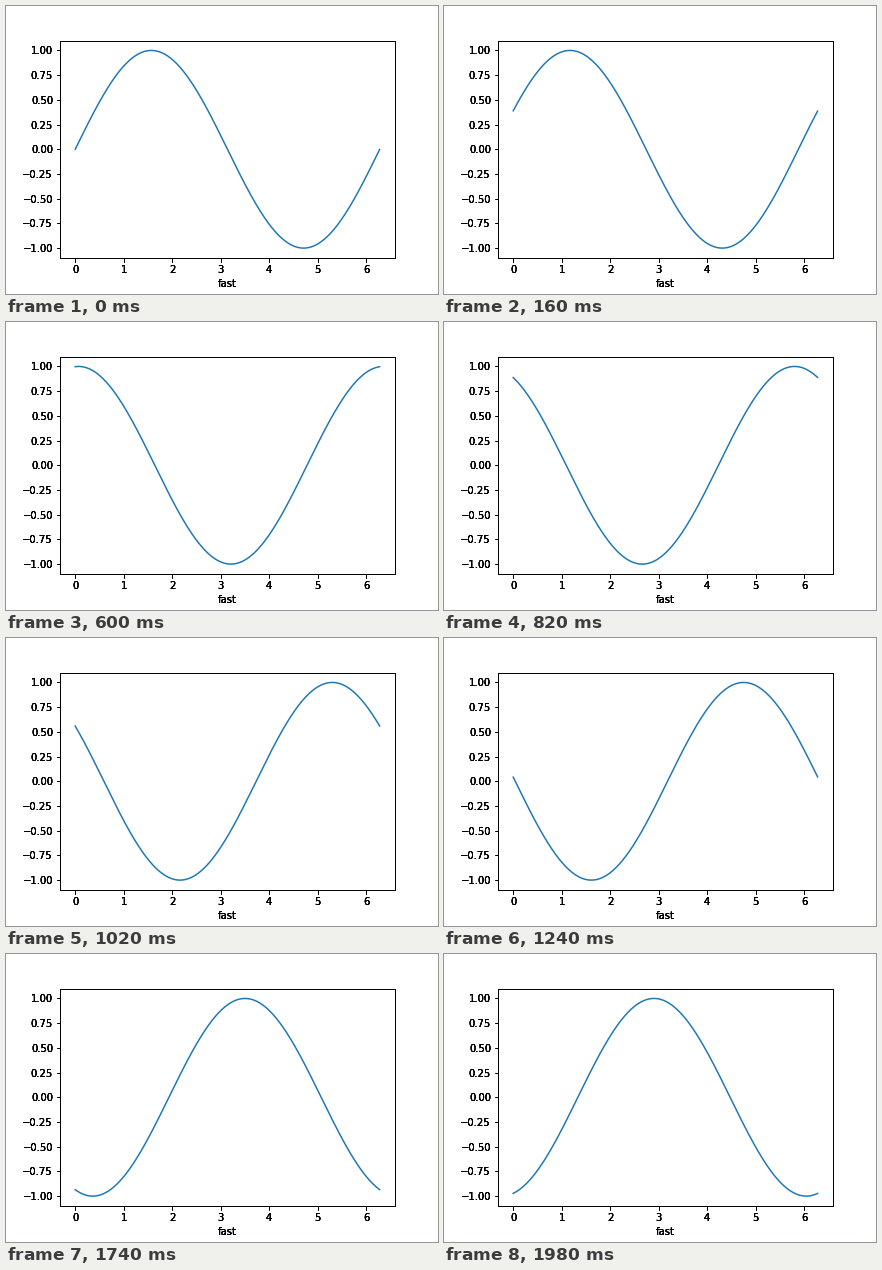
A matplotlib script that plays this animation: 432 px wide and 288 px high, repeating every 2000 ms.

```python
import numpy as np
import matplotlib.pyplot as plt
from matplotlib.animation import FuncAnimation

FRAMES = 100
INTERVAL = 20   # ms
STEP = 0.05     # phase advance per frame
LAYERS = 4      # overprinted axes give the heavy ink of labels and frame

plt.rcParams.update({
    "font.family": "DejaVu Sans",
    "font.size": 10,
    "figure.subplot.left": 0.125,
    "figure.subplot.right": 0.9,
    "figure.subplot.bottom": 0.125,
    "figure.subplot.top": 0.88,
})

x = np.arange(0, 2 * np.pi, 0.01)

fig, ax = plt.subplots(figsize=(6, 4), dpi=72, facecolor="white")
line, = ax.plot(x, np.sin(x), color="#1f77b4", lw=1.5)
ax.set_xlabel("fast")
ax.set_xlim(ax.get_xlim())
ax.set_ylim(ax.get_ylim())


def overprint(base):
    """Repeat the frame, ticks and label of an axes on top of it."""
    top = fig.add_axes(base.get_position(), facecolor="none")
    top.set(xlim=base.get_xlim(), ylim=base.get_ylim(),
            xlabel=base.get_xlabel())


for _ in range(LAYERS - 1):
    overprint(ax)


def update(i):
    line.set_ydata(np.sin(x + i * STEP))
    return line,


anim = FuncAnimation(fig, update, frames=FRAMES, interval=INTERVAL,
                     repeat=True, repeat_delay=0, blit=False)
plt.show()
```
